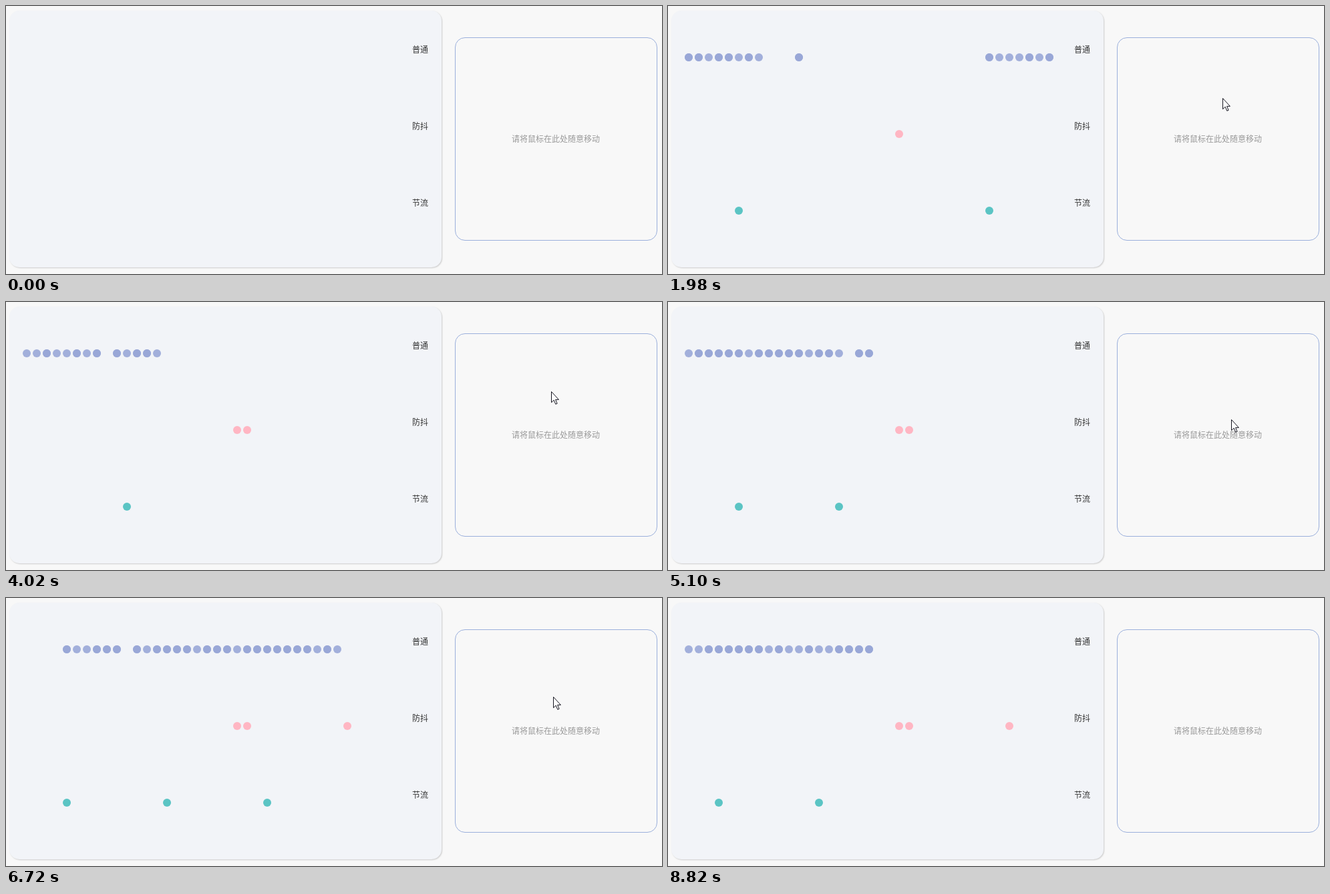
Recreate the animation shown at these times as an HTML page with a canvas. Size 982x402 px, loop 9.12 s.

```html
<!DOCTYPE html>
<html lang="zh">
<head>
<meta charset="utf-8">
<title>防抖与节流</title>
<style>
  html, body { margin: 0; width: 100%; height: 100%; overflow: hidden; background: #f8f8f8; }
  body { position: relative; font: 12px/16px "Noto Sans CJK SC", "Noto Sans CJK", sans-serif; color: #333; }
  div, span, canvas { position: absolute; box-sizing: border-box; }
  .panel { left: 5px; top: 7px; width: 647px; height: 385px; border-radius: 15px;
    background: #f2f4f8; box-shadow: 1px 1px 2px rgba(0, 0, 0, .18); }
  .pad { left: 672px; top: 47px; width: 303px; height: 305px; border-radius: 15px; border: 1px solid #9bb0dc; }
  span { left: 608px; white-space: nowrap; }
  .hint { left: 757px; top: 191px; color: #999; }
  canvas { left: 0; top: 0; }
</style>
</head>
<body>
<div class="panel"></div>
<div class="pad"></div>
<span style="top:57px">普通</span>
<span style="top:172px">防抖</span>
<span style="top:287px">节流</span>
<span class="hint">请将鼠标在此处随意移动</span>
<canvas id="stage" width="982" height="402"></canvas>
<script>
const ctx = document.getElementById('stage').getContext('2d');
const LOOP = 9120, STEP = 60, COLS = 41;

// Bursts of mouse movement: time span, running columns covered, columns missed,
// and when and where the debounced call lands.
const bursts = [
  { t: [120, 1200], k: [16, 52], miss: [49, 51], fire: [1500, 62] },
  { t: [1800, 3780], k: [71, 136], miss: [131, 131], fire: [4020, 145], every: 10.28 },
  { t: [4440, 5280], k: [159, 188], miss: [180, 180], fire: [5520, 196] },
  { t: [5880, 7680], k: [209, 267], miss: [215, 215] },
  { t: [7800, 8820], k: [270, 305], miss: [] },
];

// Pointer key points by time spent moving: ms, x, y
const keys = [[0, 962, 61], [360, 815, 140], [1080, 808, 150], [1260, 830, 138],
  [3060, 816, 134], [3720, 843, 176], [4740, 819, 148], [5580, 863, 125],
  [6300, 815, 160], [6600, 954, 62], [6660, 974, 56]];

const clamp = (v, lo, hi) => Math.min(hi, Math.max(lo, v));
const mix = (a, b, u) => a + (b - a) * u;
const sweepOf = k => Math.floor(k / COLS);

function random(n) {
  const s = Math.sin(n * 12.9898) * 43758.5453;
  return s - Math.floor(s);
}

const plain = [], throttled = [];
for (const { k: [from, to], miss, every = 10 } of bursts) {
  for (let k = from; k <= to; k++) if (!(k >= miss[0] && k <= miss[1])) plain.push(k);
  for (let k = from; Math.round(k) <= to; k += every) throttled.push(Math.round(k));
}

function columnAt(t) {
  const { t: [a, b], k } = bursts.filter(s => t >= s.t[0]).pop();
  return Math.round(mix(k[0], k[1], clamp((t - a) / (b - a), 0, 1)));
}

function dot(k, y, color, times = 1) {
  ctx.fillStyle = color;
  for (let i = 0; i < times; i++) {
    ctx.beginPath();
    ctx.arc(31 + 15 * (k % COLS), y, 6, 0, Math.PI * 2);
    ctx.fill();
  }
}

// A row is wiped by its first dot after the sweep wraps.
function currentSweep(list, now) {
  const seen = list.filter(k => k <= now);
  const sweep = sweepOf(seen[seen.length - 1]);
  return seen.filter(k => sweepOf(k) === sweep);
}

// Wander in small loops between key points.
function pointerAt(t) {
  const m = bursts.reduce((sum, { t: [a, b] }) => sum + clamp(t, a, b) - a, 0);
  const i = clamp(keys.findIndex(p => p[0] > m) - 1, 0, keys.length - 2);
  const [a, b] = [keys[i], keys[i + 1]];
  const u = clamp((m - a[0]) / (b[0] - a[0]), 0, 1);
  const loop = Math.sin(Math.PI * u);
  return [
    mix(a[1], b[1], u) + 16 * loop * (Math.cos(m / 150) - 1),
    mix(a[2], b[2], u) + 18 * loop * Math.sin(m / 150),
  ].map(Math.round);
}

const arrow = new Path2D('M.5 .5V16.7L4.2 13.2L6.8 19.3L9.1 18.3L6.6 12.4H11.4Z');

function drawPointer(t) {
  ctx.save();
  ctx.translate(...pointerAt(t));
  ctx.lineJoin = 'round';
  ctx.fillStyle = '#fff';
  ctx.strokeStyle = '#15151f';
  ctx.fill(arrow);
  ctx.stroke(arrow);
  ctx.restore();
}

function draw(t) {
  ctx.clearRect(0, 0, 982, 402);
  if (t < bursts[0].t[0]) return;
  const now = columnAt(t);
  for (const k of currentSweep(plain, now)) {
    dot(k, 77, 'rgba(152, 166, 215, .89)', random(k) < .35 ? 1 : 2);
  }
  for (const { fire } of bursts) if (fire && t >= fire[0]) dot(fire[1], 192, '#ffb6c3');
  for (const k of currentSweep(throttled, now)) dot(k, 307, '#5bc4c4');
  if (t < 8820) drawPointer(t);
}

function tick() {
  const t = performance.now() % LOOP;
  draw(Math.floor(t / STEP) * STEP);
  requestAnimationFrame(tick);
}
tick();
</script>
</body>
</html>
```
